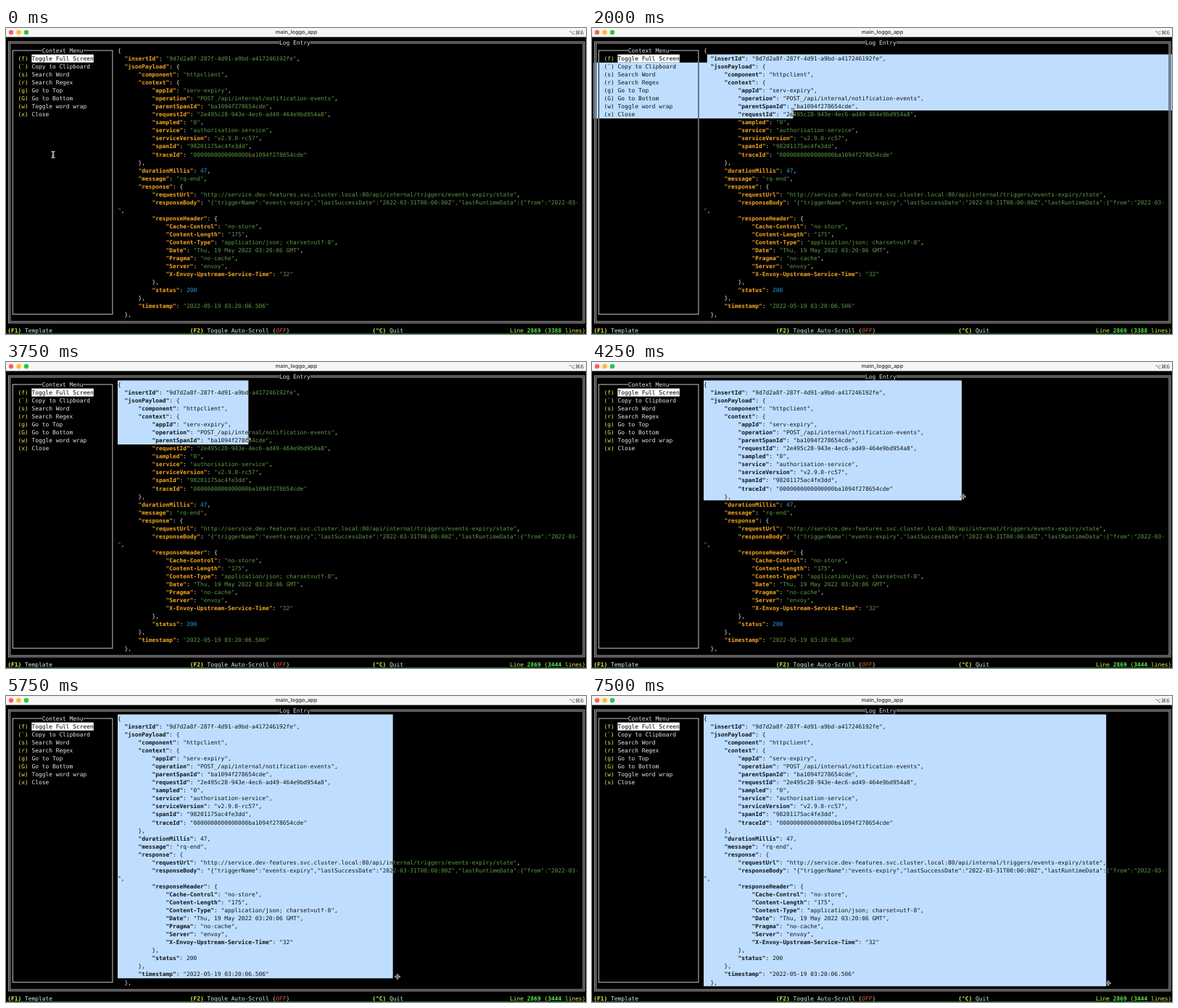
An HTML page with a canvas for the animation above (7750 ms loop, 800 px wide and 423 px high).

```html
<!DOCTYPE html>
<html lang="en">
<head>
<meta charset="utf-8">
<title>Log viewer</title>
<style>
  html, body { margin: 0; width: 100%; height: 100%; overflow: hidden; background: #000; }
  canvas { display: block; width: 800px; height: 423px; }
</style>
</head>
<body>
<canvas id="stage" width="800" height="423"></canvas>
<script>
const ctx = document.getElementById('stage').getContext('2d');
const LOOP = 7750, STEP = 250;

// Terminal grid: 168 columns by 37 rows
const LEFT = 2.2, TOP = 14.5, CELL_W = 4.745, CELL_H = 11.05, COLS = 168;
const colX = col => LEFT + col * CELL_W;
const rowY = row => TOP + row * CELL_H;

const WHITE = '#e6e6e6', YELLOW = '#e8e25a', ORANGE = '#f5a623', GREEN = '#5d9c45',
      BLUE = '#2f9be6', RED = '#f0513c', LIME = '#62e64f', LINE = '#c4c4c4', SELECTED = '#bfdeff';

const MENU = [
  ['f', 'Toggle Full Screen'], ['`', 'Copy to Clipboard'], ['s', 'Search Word'],
  ['r', 'Search Regex'], ['g', 'Go to Top'], ['G', 'Go to Bottom'],
  ['w', 'Toggle word wrap'], ['x', 'Close']
];

const LOG = `{
  "insertId": "9d7d2a8f-287f-4d91-a9bd-a417246192fe",
  "jsonPayload": {
      "component": "httpclient",
      "context": {
          "appId": "serv-expiry",
          "operation": "POST_/api/internal/notification-events",
          "parentSpanId": "ba1094f278654cde",
          "requestId": "2e495c28-943e-4ec6-ad49-464e9bd954a8",
          "sampled": "0",
          "service": "authorisation-service",
          "serviceVersion": "v2.9.0-rc57",
          "spanId": "98201175ac4fe3dd",
          "traceId": "0000000000000000ba1094f278654cde"
      },
      "durationMillis": 47,
      "message": "rq-end",
      "response": {
          "requestUrl": "http://service.dev-features.svc.cluster.local:80/api/internal/triggers/events-expiry/state",
          "responseBody": "{"triggerName":"events-expiry","lastSuccessDate":"2022-03-31T00:00:00Z","lastRuntimeData":{"from":"2022-03-
",
          "responseHeader": {
              "Cache-Control": "no-store",
              "Content-Length": "175",
              "Content-Type": "application/json; charset=utf-8",
              "Date": "Thu, 19 May 2022 03:20:06 GMT",
              "Pragma": "no-cache",
              "Server": "envoy",
              "X-Envoy-Upstream-Service-Time": "32"
          },
          "status": 200
      },
      "timestamp": "2022-05-19 03:20:06.506"
  },`.split('\n');

// Paths as [time, x, y]; the block selection is in cells
const POINTER = [
  [0, 65, 175], [1000, 160, 42], [2000, 277, 116], [2250, 280, 116], [2500, 240, 80],
  [3000, 184, 25], [3250, 156, 27], [4250, 512, 186], [5000, 505, 359], [5750, 540, 388],
  [6500, 540, 388], [6750, 671, 387], [7500, 712, 397]
];
const BLOCK = [
  [3250, 33, 1], [4250, 107, 15], [5000, 106, 31], [5750, 112, 33],
  [6500, 112, 33], [6750, 137, 33], [7500, 149, 34]
];

function along(path, t) {
  const next = path.findIndex(point => point[0] > t);
  if (next < 0) return path[path.length - 1].slice(1);
  if (next === 0) return path[0].slice(1);
  const a = path[next - 1], b = path[next], u = (t - a[0]) / (b[0] - a[0]);
  return [a[1] + (b[1] - a[1]) * u, a[2] + (b[2] - a[2]) * u];
}

const FONT = '20px "DejaVu Sans Mono", monospace';
ctx.textRendering = 'geometricPrecision';
ctx.font = FONT;
const textScale = CELL_W / ctx.measureText('M').width;

let ink = null; // when set, replaces every colour

// Writes text at a cell and returns the column after it
function put(col, row, text, color = WHITE, style = '') {
  ctx.save();
  ctx.translate(colX(col), rowY(row) + 8.3);
  ctx.scale(textScale, textScale);
  ctx.font = `${style} ${FONT}`;
  ctx.fillStyle = ink || color;
  ctx.fillText(text, 0, 0);
  ctx.restore();
  return col + text.length;
}

const putAll = (col, row, parts) =>
  parts.reduce((at, [text, color, style]) => put(at, row, text, color, style), col);

function fillCells(col, row, cols, rows, color) {
  ctx.fillStyle = color;
  ctx.fillRect(colX(col), rowY(row), cols * CELL_W, rows * CELL_H);
}

function frame(col0, row0, col1, row1, grow, width) {
  const x = colX(col0 + .5) - grow, y = rowY(row0 + .5) - grow;
  ctx.strokeStyle = ink || LINE;
  ctx.lineWidth = width;
  ctx.strokeRect(x, y, colX(col1 + .5) + grow - x, rowY(row1 + .5) + grow - y);
}

function heading(col, row, text) {
  fillCells(col, row, text.length, 1, ink ? SELECTED : '#000');
  put(col, row, text);
}

function logLine(line, row) {
  const [, indent, key = '', colon = '', value, tail] =
    line.match(/^( *)(?:("[^"]+")(: ))?(.*?)([{},]*)$/);
  putAll(32 + indent.length, row, [
    [key, ORANGE, 'bold'], [colon],
    [value, /^\d/.test(value) ? BLUE : GREEN], [tail]
  ]);
}

function terminal(t) {
  frame(0, 0, 167, 35, 1, .9);
  frame(0, 0, 167, 35, -1, .9);
  heading(79, 0, 'Log Entry');
  frame(1, 1, 30, 34, 0, 1);
  heading(10, 1, 'Context Menu');

  MENU.forEach(([key, label], i) => {
    const row = i + 2;
    put(3, row, `(${key})`, YELLOW);
    if (i === 0) fillCells(7, row, label.length, 1, '#fff');
    put(7, row, label, i === 0 ? '#000' : WHITE);
  });
  LOG.forEach((line, i) => logLine(line, i + 1));

  putAll(0, 36, [['(F1) ', YELLOW, 'bold'], ['Template']]);
  putAll(53, 36, [['(F2) ', YELLOW, 'bold'], ['Toggle Auto-Scroll ('], ['OFF', RED, 'italic'], [')']]);
  putAll(106, 36, [['(^C) ', YELLOW, 'bold'], ['Quit']]);
  putAll(146, 36, [
    ['Line ', YELLOW], ['2869', LIME, 'bold'], [' (', YELLOW],
    [t < 2750 ? '3388' : '3444', LIME, 'bold'], [' lines)', YELLOW]
  ]);
}

// Selected areas as [col, row, cols, rows]
function selection(t, x, y) {
  if (t > 1000 && t < 2500) {
    const first = 2, start = 33;
    const row = Math.floor((y - TOP) / CELL_H), end = Math.round((x - LEFT) / CELL_W);
    if (row === first) return [[start, row, end - start, 1]];
    return [
      [start, first, COLS + 1 - start, 1],
      [0, first + 1, COLS + 1, row - first - 1],
      [0, row, end, 1]
    ];
  }
  if (t > 3250) {
    const [col, row] = along(BLOCK, t).map(Math.round);
    return [[32, 1, col - 32, row]];
  }
  return [];
}

function drawSelected(areas, t) {
  if (!areas.length) return;
  ctx.save();
  ctx.beginPath();
  for (const [col, row, cols, rows] of areas)
    ctx.rect(colX(col), rowY(row), cols * CELL_W, rows * CELL_H);
  ctx.clip();
  ctx.fillStyle = SELECTED;
  ctx.fillRect(0, 0, 800, 423);
  ink = '#101418';
  terminal(t);
  ink = null;
  ctx.restore();
}

function pointer(x, y, isCross) {
  const shape = new Path2D(isCross
    ? 'M-3.8 0H3.8M0 -3.8V3.8'
    : 'M-2.4 -4.3Q0 -4.3 0 -3Q0 -4.3 2.4 -4.3M0 -3V3M-2.4 4.3Q0 4.3 0 3Q0 4.3 2.4 4.3M-1.3 1H1.3');
  ctx.save();
  ctx.translate(x, y);
  ctx.strokeStyle = isCross ? '#d8d8d8' : '#555';
  ctx.lineWidth = 2.4;
  ctx.stroke(shape);
  ctx.strokeStyle = isCross ? '#444' : '#ddd';
  ctx.lineWidth = 1;
  ctx.stroke(shape);
  ctx.restore();
}

function titleBar() {
  ctx.fillStyle = '#f5f5f5';
  ctx.fillRect(0, 0, 800, 12.5);
  [['#ff5f57', 7], ['#febc2e', 17.5], ['#28c840', 28]].forEach(([color, x]) => {
    ctx.fillStyle = color;
    ctx.beginPath();
    ctx.arc(x, 6, 3.2, 0, 7);
    ctx.fill();
  });
  ctx.fillStyle = '#444';
  ctx.textAlign = 'center';
  ctx.font = '600 7.3px Inter, sans-serif';
  ctx.fillText('main_loggo_app', 400.5, 8.4);
  ctx.textAlign = 'right';
  ctx.font = '7.4px "DejaVu Sans", sans-serif';
  ctx.fillText('⌥⌘6', 797, 8.6);
  ctx.textAlign = 'left';
}

function draw(now) {
  const t = Math.floor(now % LOOP / STEP) * STEP;
  const [x, y] = along(POINTER, t);
  ctx.fillStyle = '#000';
  ctx.fillRect(0, 0, 800, 423);
  terminal(t);
  drawSelected(selection(t, x, y), t);
  titleBar();
  ctx.fillStyle = '#0c6a22';
  ctx.fillRect(0, 422, 800, 1);
  pointer(x, y, t >= 2750);
}

const start = performance.now();
function tick() {
  draw(performance.now() - start);
  requestAnimationFrame(tick);
}
tick();
</script>
</body>
</html>
```
